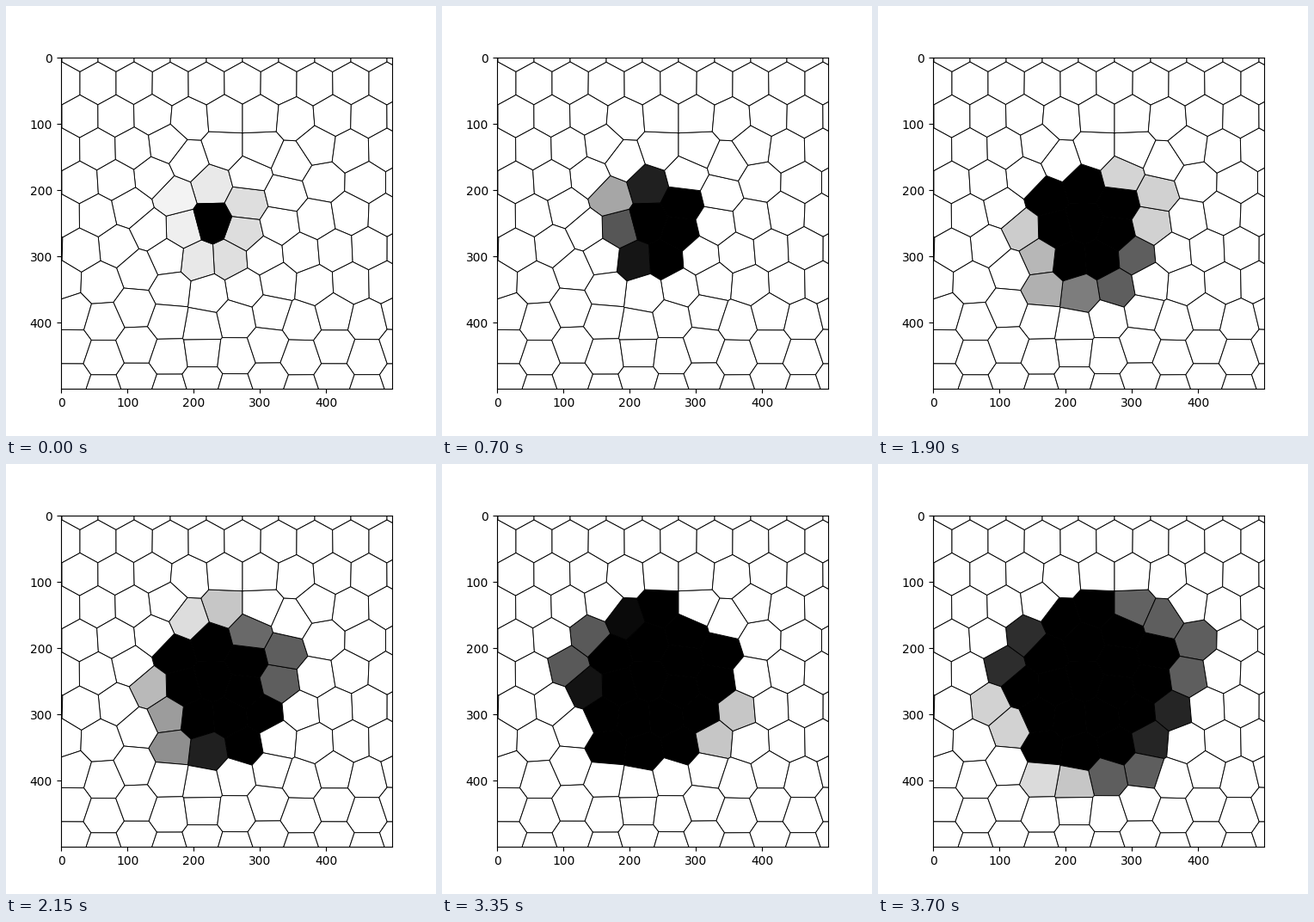
A matplotlib script that plays this animation: 500 px wide and 500 px high, repeating every 3.75 s.

```python
import numpy as np
import matplotlib.pyplot as plt
from matplotlib.animation import FuncAnimation
from matplotlib.collections import PolyCollection

STEP, LOOP = 50, 3750
LEFT, TOP, SIDE = 63.75, 60, 385
CENTRE = (240, 251)

# Centres of the cells that darken, by the time (ms) each wave sets off.
waves = {
    -75: [(239, 208), (280, 229), (276, 264), (260, 294), (223, 296),
          (206, 260), (196, 221)],
    1500: [(187, 292), (167, 261)],
    1550: [(300, 291), (278, 328), (235, 335), (192, 330)],
    1800: [(319, 254), (325, 218), (284, 196)],
    1960: [(253, 166), (212, 180)],
    2050: [(145, 235), (172, 198)],
    3225: [(344, 287), (316, 321)],
    3350: [(297, 166), (333, 182), (369, 204), (361, 248), (309, 356),
           (267, 364), (154, 307), (130, 279)],
    3550: [(228, 373), (189, 366)],
}
spots = np.array([p for group in waves.values() for p in group], float)
starts = np.repeat(list(waves), [len(group) for group in waves.values()])

# Darkening per step grows towards the east and a little to the south.
rates = np.clip(0.029 + 0.00065 * (spots[:, 0] - 187)
                + 0.00015 * (spots[:, 1] - CENTRE[1]), 0.025, 0.09)
west = spots[:, 0] < 200


def lattice():
    """Staggered rows above, staggered columns in the lowest part."""
    rows = [(191 + 42 * i + 21 * (j % 2), 90 + 38.4 * j)
            for j in range(-2, 7) for i in range(-6, 9)]
    columns = [(190 + 38.3 * i, 365 + 38.5 * k + 5 * (-1) ** i)
               for k in range(4) for i in range(-5, 9)]
    return np.array(rows + columns)


def clip(poly, mid, normal):
    """Keep the part of a polygon behind the line through mid."""
    side = (poly - mid) @ normal
    out = []
    for i in range(len(poly)):
        a, b, da, db = poly[i - 1], poly[i], side[i - 1], side[i]
        if da * db < 0:
            out.append(a + (b - a) * da / (da - db))
        if db <= 0:
            out.append(b)
    return np.array(out)


def voronoi(points):
    lo, hi = -60, 560
    box = np.array([(lo, lo), (hi, lo), (hi, hi), (lo, hi)], float)
    cells = []
    for p in points:
        near = np.argsort(np.hypot(*(points - p).T))[1:30]
        poly = box
        for q in points[near]:
            poly = clip(poly, (p + q) / 2, q - p)
        cells.append(poly)
    return cells


def centroid(poly):
    nxt = np.roll(poly, -1, axis=0)
    cross = poly[:, 0] * nxt[:, 1] - nxt[:, 0] * poly[:, 1]
    return ((poly + nxt) * cross[:, None]).sum(axis=0) / (3 * cross.sum())


def build_mesh():
    """Fit the lattice around the fixed centres, then even it out."""
    fixed = np.vstack([spots, CENTRE])
    grid = lattice()
    gap = np.linalg.norm(grid[:, None] - fixed, axis=2).min(axis=1)
    points = np.vstack([fixed, grid[gap > 24]])
    for _ in range(3):
        for i, poly in enumerate(voronoi(points)):
            inside = 45 < points[i].min() and points[i].max() < 460
            if i >= len(fixed) and inside:
                points[i] = centroid(poly)
    return voronoi(points)


def hold(ms, stretches, pace):
    """Advance only once per pace within the given stretches."""
    for start, end in stretches:
        if start <= ms < end:
            return start + (ms - start) // pace * pace
    return ms


cells = [(poly - (LEFT, TOP)) * 500 / SIDE - 0.5 for poly in build_mesh()]

fig, ax = plt.subplots(figsize=(5, 5), dpi=100)
ax.set_xlim(-0.5, 499.5)
ax.set_ylim(499.5, -0.5)
ax.set_aspect("equal")
ax.set_xticks(range(0, 500, 100))
ax.set_yticks(range(0, 500, 100))

mesh = PolyCollection(cells, edgecolors="black", linewidths=0.68,
                      joinstyle="round")
ax.add_collection(mesh, autolim=False)


def draw(frame):
    ms = hold(frame * STEP, [(500, 1200), (2650, 3250)], 100)
    slow = hold(ms, [(500, 1550), (2050, 2650)], LOOP)
    elapsed = np.where(west, slow, ms) - starts
    shade = np.ones(len(cells))
    shade[:len(spots)] = 1 - np.clip(elapsed / STEP * rates, 0, 1)
    shade[len(spots)] = 0
    mesh.set_facecolor([(s, s, s) for s in shade])
    return [mesh]


anim = FuncAnimation(fig, draw, frames=LOOP // STEP, interval=STEP,
                     repeat=True, repeat_delay=0)
plt.show()
```
